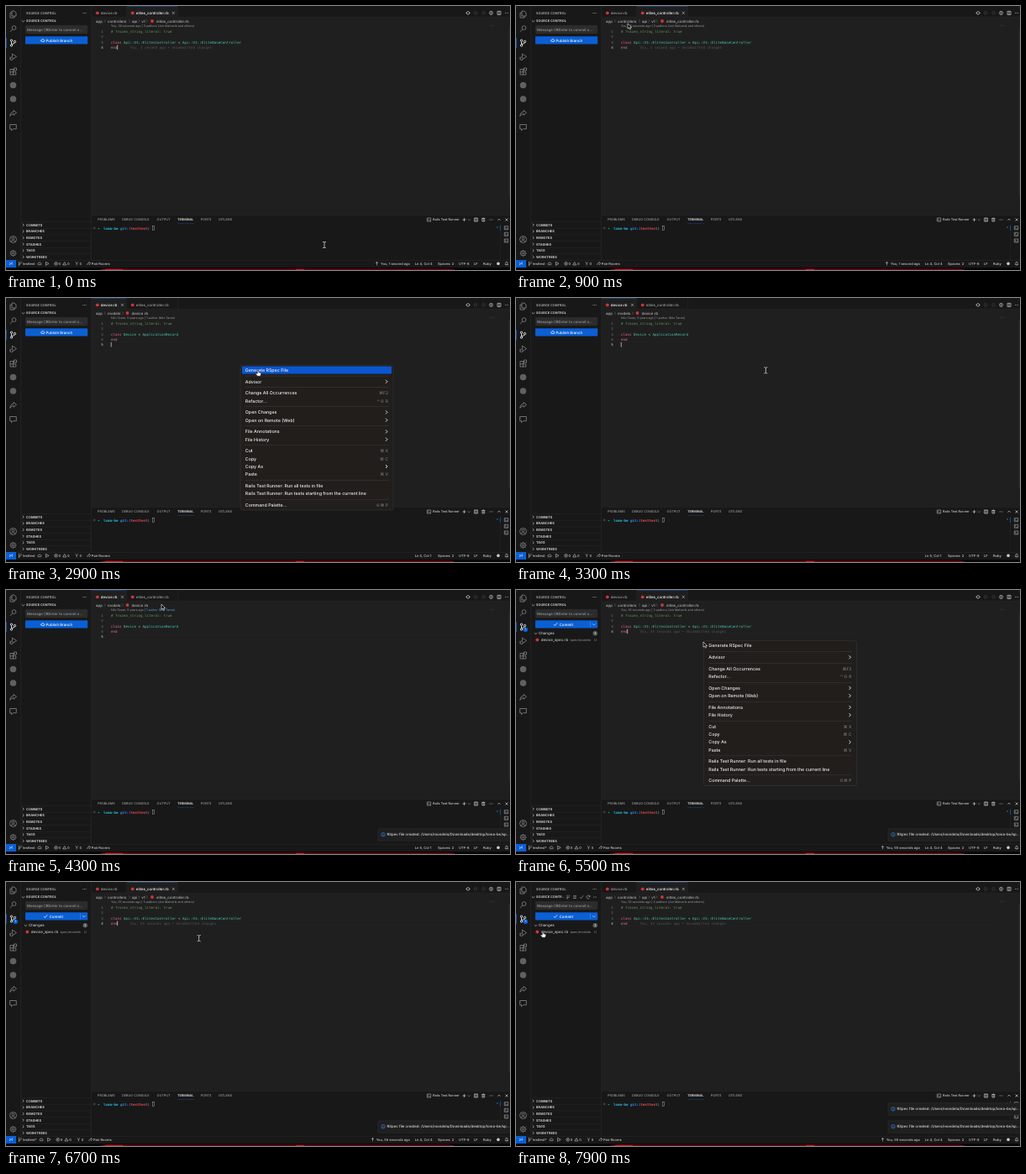
An HTML page that plays this animation: 600x315 px, repeating every 8 s.

```html
<!DOCTYPE html>
<html lang="en">
<head>
<meta charset="utf-8">
<title>Editor session</title>
<style>
html, body { margin: 0; width: 100%; height: 100%; overflow: hidden; background: #1f1f1f; }
svg { display: block; width: 100vw; height: 100vh; }
text { font-family: Inter, "DejaVu Sans", sans-serif; font-weight: 500; text-rendering: geometricPrecision; white-space: pre; }
.mono { font-family: "DejaVu Sans Mono", monospace; font-weight: 400; }
.bold { font-weight: 700; }
.end { text-anchor: end; }
.mid { text-anchor: middle; }
</style>
</head>
<body>
<svg id="stage" viewBox="0 0 600 315"></svg>
<script>
const LOOP = 8000, STEP = 100;
const BLUE = '#0a5fd4', GREY = '#868686', LIGHT = '#cccccc', RED = '#d13438', LINE = '#2b2b2b';

// Markup helpers; text is placed by its vertical centre.
const text = (x, y, s, size = 4.4, fill = LIGHT, cls = '') =>
  `<text x="${x}" y="${y + size * .36}" font-size="${size}" fill="${fill}" class="${cls}">${s}</text>`;
const code = (x, y, s, fill, cls = '') => text(x, y, s, 4.18, fill, 'mono ' + cls);
const box = (x, y, w, h, fill, more = '') =>
  `<rect x="${x}" y="${y}" width="${w}" height="${h}" fill="${fill}" ${more}/>`;
const dot = (x, y, r, fill, more = '') => `<circle cx="${x}" cy="${y}" r="${r}" fill="${fill}" ${more}/>`;
const path = (d, stroke = LIGHT, w = .7, fill = 'none') =>
  `<path d="${d}" stroke="${stroke}" stroke-width="${w}" fill="${fill}"/>`;
const icon = (x, y, d, stroke, w) => `<g transform="translate(${x} ${y})">${path(d, stroke, w)}</g>`;
const group = (id, ...parts) => `<g id="${id}">${parts.join('')}</g>`;
const span = (s, fill) => `<tspan fill="${fill}">${s}</tspan>`;
const ring = r => `M${-r} 0a${r} ${r} 0 1 0 ${2 * r} 0a${r} ${r} 0 1 0 ${-2 * r} 0`;

const RIGHT = 'M-.8 -1.6L.8 0L-.8 1.6', DOWN = 'M-1.6 -.7L0 .9L1.6 -.7', UP = 'M-1.6 .7L0 -.9L1.6 .7';
const CROSS = 'M-1.5 -1.5L1.5 1.5M1.5 -1.5L-1.5 1.5', PLUS = 'M-2 0H2M0 -2V2', CHECK = 'M-2 0L-.6 1.6L2.2 -1.8';
const SPLIT = 'M-2 -2H2V2H-2ZM0 -2V2', DOTS = 'M-2 0h.8M-.4 0h.8M1.2 0h.8';
const BRANCH = 'M-1 -1.6V1.8M1.4 -1.4V-.6Q1.4 .6 -1 .8M-1.6 -2h1.2M.8 -2h1.2M-1.6 2h1.2';
const CLOUD = 'M-1.6 1.3H1.6A1.1 1.1 0 0 0 1.4 -.6A1.6 1.6 0 0 0 -1.4 -.6A1 1 0 0 0 -1.6 1.3';
const TERMINAL = 'M-2.2 -2H2.2V2H-2.2ZM-1.3 -.9L-.3 0L-1.3 .9M.2 1H1.4';
const TRASH = 'M-2 -1.5H2M-1.4 -1.5V2H1.4V-1.5M-.6 -2.1H.6M0 -.6V1.2';
const BEAM = 'M-2 -3.7Q0 -3.7 0 -2.6Q0 -3.7 2 -3.7M0 -2.6V2.6M-2 3.7Q0 3.7 0 2.6Q0 3.7 2 3.7';

function activityBar() {
  const draw = (y, d, color = GREY) => icon(8.5, y, d, color, .8);
  return box(0, 0, 18, 303, '#181818') + box(17.4, 0, .5, 303, LINE) +
    draw(10, 'M-1.5 -4H1.5L3.5 -2V2H-1.5ZM-1.5 -2H-3.5V4H1.5V2') +
    draw(27, 'M-3.5 3.8L-.9 .8M-1.4 -1a2.4 2.4 0 1 0 4.8 0a2.4 2.4 0 1 0 -4.8 0') +
    box(0, 38, .8, 12, BLUE) +
    draw(44, 'M-2 -1.5V1.7M2 -.3Q2 1 -2 1.5M-3.2 -2.8a1.2 1.2 0 1 0 2.4 0a1.2 1.2 0 1 0 -2.4 0M.8 -1.5a1.2 1.2 0 1 0 2.4 0a1.2 1.2 0 1 0 -2.4 0M-3.2 3a1.2 1.2 0 1 0 2.4 0a1.2 1.2 0 1 0 -2.4 0', '#fff') +
    draw(61, 'M-1 -4L4 -.5L-.4 2.5M-1 -4V-.5M-3.6 1.8a1.6 1.9 0 1 0 3.2 0a1.6 1.9 0 1 0 -3.2 0M-4 0L-3 .8M-4.2 2h1') +
    draw(78, 'M-3.5 -2.5H0V4H-3.5ZM-3.5 .8H3.3V4H0M1 -4H4V-1H1Z') +
    dot(8.5, 94.5, 3.8, '#606060') + dot(8.5, 111, 3.8, '#606060') +
    draw(128, 'M.6 -3.6L4 -.6L.6 2.2V.6Q-2 .5 -3.6 3.4Q-3.6 -1.4 .6 -1.8Z') +
    draw(144.5, 'M-3.8 -3H3.8V2.2H0L-2 4V2.2H-3.8Z') +
    draw(278.5, ring(4) + 'M-1.4 -1a1.4 1.4 0 1 0 2.8 0a1.4 1.4 0 1 0 -2.8 0M-2.6 2.8Q0 -.4 2.6 2.8') +
    draw(295, ring(2.9) + ring(1.1) + 'M0 -4V-2.9M0 4V2.9M-4 0H-2.9M4 0H2.9M-2.8 -2.8l.8 .8M2.8 2.8l-.8 -.8M-2.8 2.8l.8 -.8M2.8 -2.8l-.8 .8') +
    group('scmBadge', dot(11.3, 47.2, 2.8, BLUE), text(11.3, 47.2, '1', 3.4, '#fff', 'mid'));
}

function sidebar() {
  const sections = ['COMMITS', 'BRANCHES', 'REMOTES', 'STASHES', 'TAGS', 'WORKTREES'];
  return box(18, 0, 84, 303, '#181818') + box(101.3, 0, .5, 303, LINE) +
    text(24, 8.5, 'SOURCE CONTROL', 3.85) + icon(93.5, 8.5, DOTS) +
    icon(20.5, 18, DOWN) + text(24, 18, 'SOURCE CONTROL', 3.85, LIGHT, 'bold') +
    group('headerActions', box(54.6, 15, 46, 6, '#181818'), text(54.7, 18, '...', 3.85, LIGHT, 'bold'),
      icon(62, 18, BRANCH, LIGHT, .5), icon(70, 18, 'M-1.8 -1.5H1.8M-1.8 0H1.8M-1.8 1.5H1.8', LIGHT, .5),
      icon(78, 18, CHECK, LIGHT, .5), icon(86, 18, 'M1.8 -.6A1.9 1.9 0 1 0 1.6 1M2 -2V-.5H.6', LIGHT, .5), icon(94, 18, DOTS)) +
    box(23.3, 23.3, 73.6, 9.4, '#2c2c2c', 'stroke="#363636" stroke-width=".4" rx=".8"') +
    text(25, 28, 'Message (⌘Enter to commit o...', 4.35, '#989898') +
    box(23, 36.2, 74.2, 9.4, BLUE, 'rx=".8"') +
    group('publish', icon(43.8, 41, CLOUD, '#fff', .8), text(47.5, 41, 'Publish Branch', 4.45, '#fff')) +
    group('changes', icon(47, 41, CHECK, '#fff'), text(51.5, 41, 'Commit', 4.45, '#fff'),
      box(88, 37.7, .4, 6.4, '#6fa4e6'), icon(92.8, 41, DOWN, '#fff', .6),
      icon(23.5, 51.8, DOWN), text(27, 51.8, 'Changes'),
      dot(94.2, 51.8, 2.7, '#616161'), text(94.2, 51.8, '1', 3.6, '#fff', 'mid'),
      dot(25.3, 59.5, 1.9, RED), text(29.8, 59.5, 'device_spec.rb', 4.45, '#c4cfc6'),
      text(64.5, 59.5, 'spec/models', 3.95, '#858585'), text(94.5, 59.5, 'U', 3.8, '#7d8f82', 'mid')) +
    sections.map((name, i) => {
      const y = 261.3 + i * 7.63;
      return box(18, y - 3.8, 83.3, .4, LINE) + icon(20.5, y, RIGHT) + text(24, y, name, 3.9, LIGHT, 'bold');
    }).join('');
}

function tabs() {
  const tab = (id, x, w, name, closeX) =>
    group(id, box(x, 0, w, 13.4, '#1f1f1f'), box(x, 0, w, .4, BLUE), icon(closeX, 8.3, CROSS, LIGHT, .6),
      text(x + 10.8, 8.3, name, 4.4, '#fff'));
  return box(102, 0, 498, 13, '#181818') + box(102, 12.8, 498, .4, LINE) +
    text(112.8, 8.3, 'device.rb', 4.4, '#a4a4a4') + text(154.8, 8.3, 'elites_controller.rb', 4.4, '#a4a4a4') +
    tab('deviceTab', 102, 41.5, 'device.rb', 138.5) + tab('elitesTab', 144, 60, 'elites_controller.rb', 199.3) +
    dot(108.8, 8.3, 1.9, RED) + dot(150.7, 8.3, 1.9, RED) +
    box(143.5, 0, .4, 13, LINE) + box(204, 0, .4, 13, LINE) +
    icon(550, 8.3, ring(1.7) + 'M-2.7 0h1M1.7 0h1') + icon(559, 8.3, ring(1.7), '#444') +
    icon(568.5, 8.3, ring(1.7), '#444') + icon(577.5, 8.3, ring(2) + 'M0 -1V1') +
    icon(587, 8.3, SPLIT) + icon(596, 8.3, DOTS);
}

function crumbs(...items) {
  const [fileX, fileName] = items.pop();
  return items.map(([x, s, sep]) => text(x, 18, s, 4.4, '#b4b4b4') + icon(sep, 18, RIGHT, GREY, .4)).join('') +
    dot(fileX - 5, 18, 1.9, RED) + text(fileX, 18, fileName, 4.4, '#b4b4b4');
}

const lineY = n => 24.2 + n * 6.28;
function sourceLines(current, lines) {
  return box(124.5, lineY(current) - 3.1, 450, 6.2, 'none', 'stroke="#242424" stroke-width=".4"') +
    lines.map((s, i) => code(115.8, lineY(i + 1), i + 1, i + 1 === current ? '#ccc' : '#6e7681', 'end') +
      code(125, lineY(i + 1), s, LIGHT)).join('') +
    [0, 2, 3].map(i => box(575.5, 22 + i * .8, i === 2 ? 9 : 5, .3, '#383838')).join('');
}

function editor() {
  const comment = span('# frozen_string_literal: true', '#6a9955');
  const key = s => span(s, '#e8708c'), type = s => span(s, '#4ec9b0');
  return box(102, 13.2, 498, 236, '#1f1f1f') + box(598.8, 27, .7, 200, '#3a3a3a') +
    group('elitesFile',
      crumbs([107, 'app', 117.8], [121, 'controllers', 147], [150, 'api', 158.4], [161.3, 'v1', 167.6], [179, 'elites_controller.rb']),
      `<text id="lens" x="125" y="25.4" font-size="3.55" fill="#8a8a8a"></text>`,
      sourceLines(4, [comment, '', key('class ') + type('Api::V1::ElitesController') + ' &lt; ' + type('Api::V1::EliteBaseController'), key('end')]),
      `<text id="blame" class="mono" x="147.5" y="${lineY(4) + 1.5}" font-size="4.18" fill="#555"></text>`) +
    group('deviceFile',
      crumbs([107, 'app', 117.8], [121, 'models', 138.8], [149.5, 'device.rb']),
      text(125, 24, 'Nilo Taren, 5 years ago | <tspan id="author">1 author (Nilo Taren)</tspan>', 3.55, '#8a8a8a'),
      sourceLines(5, [comment, '', key('class ') + type('Device') + ' &lt; ' + type('ApplicationRecord'), key('end'), ''])) +
    box(0, 0, .7, 5.6, '#ddd', 'id="caret"');
}

function panel() {
  const names = [[109, 'PROBLEMS'], [138, 'DEBUG CONSOLE'], [179.5, 'OUTPUT'], [204, 'TERMINAL'], [231.8, 'PORTS'], [253, 'GITLENS']];
  return box(102, 249, 498, 54, '#181818') + box(102, 249, 498, .5, LINE) +
    names.map(([x, s]) => text(x, 255, s, 3.8, s === 'TERMINAL' ? '#fff' : '#9d9d9d')).join('') +
    box(204, 259.5, 20, .3, BLUE) + icon(503.5, 255, TERMINAL, LIGHT, .5) + text(508, 255, 'Rails Test Runner', 3.85) +
    icon(545.5, 255, PLUS) + icon(551.3, 255, DOWN, LIGHT, .4) + icon(559.5, 255, SPLIT) + icon(568.3, 255, TRASH) +
    icon(577.5, 255, DOTS) + icon(587, 255, UP) + icon(596, 255, CROSS) +
    dot(105.2, 265, 1, 'none', `stroke="${GREY}" stroke-width=".4"`) +
    code(109, 265, '➜', '#23d18b') +
    code(116, 265, span('loma-be', '#29b8db') + span(' git:(', '#3b8eea') + span('testtest', '#f14c4c') + span(')', '#3b8eea'), LIGHT, 'bold') +
    box(174.3, 262.6, 2.2, 5, 'none', 'stroke="#ccc" stroke-width=".4"') +
    box(588, 261, .4, 42, LINE) + box(588, 261.5, .7, 6.5, BLUE) + dot(585, 264, .7, '#3b8eea') +
    [264.7, 272.3, 280].map(y => icon(595.5, y, TERMINAL, LIGHT, .5)).join('');
}

function statusBar() {
  const label = (x, s) => text(x, 307.4, s, 4.05);
  const mark = (x, d) => icon(x, 307.4, d, LIGHT, .6);
  const live = (id, x, cls = '') => `<text id="${id}" class="${cls}" x="${x}" y="308.9" font-size="4.05" fill="${LIGHT}"></text>`;
  return box(0, 303, 600, 9.3, '#181818') + box(0, 303, 600, .4, LINE) + box(0, 303, 12, 9.3, BLUE) +
    icon(6, 307.4, 'M-2 -1.2L-.4 .2L-2 1.6M2 -1.8L.4 -.4L2 1', '#fff', .7) +
    mark(16.5, BRANCH) + live('branch', 20) +
    group('statusLeft', mark(40, CLOUD), mark(49, 'M-1.6 -2L2 0L-1.6 2Z'),
      mark(59.5, ring(1.8) + 'M-.8 -.8L.8 .8M.8 -.8L-.8 .8'), label(62.5, '0'),
      mark(69.7, 'M0 -1.8L2 1.6H-2Z'), label(73, '0'), mark(84.2, 'M0 -.4V2M-1.6 -1.8Q0 1 1.6 -1.8'), label(87.5, '0'),
      mark(98.5, 'M-2 1.5Q-1.6 -.9 .6 -.9V-2L2.2 -.2L.6 1.4V.5'), label(101.8, 'Pair Rooms')) +
    live('ago', 481, 'end') + group('agoIcon', mark(0, 'M0 -2V2M-1.4 -.4L0 -2L1.4 -.4')) +
    live('position', 486.8) +
    label(514, 'Spaces: 2') + label(539, 'UTF-8') + label(557, 'LF') + label(568, 'Ruby') +
    dot(586, 307.4, 1.8, LIGHT) + mark(596, 'M-1.8 1.2H1.8L1.2 .4V-.8A1.2 1.2 0 0 0 -1.2 -.8V.4ZM-.4 2h.8') +
    box(0, 312.3, 600, 2.7, '#050505') + path('M112 315L120 314.2H526L534 315', '#a80f18', .9) +
    path('M118 314.4H139M345 314.4H355', '#e01c24', 1);
}

const notification = (id, y) => group(id,
  box(443, y, 158, 14.4, '#1f1f1f', 'stroke="#303030" stroke-width=".5" rx="1"'),
  icon(449, y + 7, ring(2.2) + 'M0 -.3V1.2M0 -1.2V-.8', '#3794ff', .6),
  text(453.5, y + 7, 'RSpec file created: /Users/mondelu/Downloads/desktop/loma-be/sp...', 4.35, '#ddd'));

function contextMenu() {
  const more = '›';
  const sections = [
    [['Generate RSpec File']], [['Advisor', more]],
    [['Change All Occurrences', '⌘F2'], ['Refactor...', '⌃⇧ R']],
    [['Open Changes', more], ['Open on Remote (Web)', more]],
    [['File Annotations', more], ['File History', more]],
    [['Cut', '⌘ X'], ['Copy', '⌘ C'], ['Copy As', more], ['Paste', '⌘ V']],
    [['Rails Test Runner: Run all tests in file'], ['Rails Test Runner: Run tests starting from the current line']],
    [['Command Palette...', '⇧⌘ P']]];
  let y = 6, rows = '';
  sections.forEach((section, i) => {
    if (i) rows += box(5.5, y - 6.85, 171, .4, '#45423f');
    for (const [name, hint] of section) {
      rows += text(5.8, y, name, 5.3, '#f0f0f0');
      if (hint === more) rows += icon(174, y, 'M-1 -2L1 0L-1 2', '#eee', .9);
      else if (hint) rows += text(176, y, hint, 5, '#777', 'end');
      y += 9.3;
    }
    y += 4.4;
  });
  return group('menu', box(0, 0, 182, 173, '#211e1c', 'stroke="#3e3b39" stroke-width=".5" rx="2"'),
    box(2, 1.4, 178, 9.2, '#0a56d0', 'id="highlight" rx=".8"'), rows);
}

const pointer = () => group('pointer',
  group('beam', path(BEAM, '#000', 1.5), path(BEAM, '#eee', .8)),
  group('arrow', path('M0 0V6.2L1.5 4.9L2.5 7.1L3.6 6.6L2.6 4.5H4.6Z', '#fff', .6, '#000')),
  group('hand', path('M-.8 -2Q0 -2.9 .8 -2V.6L3.2 1.2Q4 1.6 3.7 2.8L3 5.2H-.8L-3 2.3Q-2.5 1.2 -.8 2.3Z', '#000', .6, '#fff')));

document.getElementById('stage').innerHTML = box(0, 0, 600, 315, '#1f1f1f') + activityBar() + sidebar() +
  editor() + tabs() + panel() + statusBar() + notification('olderNote', 284.8) + notification('newerNote', 263.8) +
  contextMenu() + pointer();

const ui = Object.fromEntries([...document.querySelectorAll('[id]')].map(el => [el.id, el]));
const show = (name, on) => { ui[name].style.display = on ? '' : 'none'; };
const place = (name, x, y) => ui[name].setAttribute('transform', `translate(${x} ${y})`);

// Pointer stops: time, x, y.
const stops = [[0, 379, 285], [200, 379, 285], [1000, 122, 9], [1100, 122, 9], [1600, 279, 81], [1900, 279, 81],
  [2700, 300, 88], [3200, 300, 88], [4300, 185, 17], [4500, 174, 9], [4700, 174, 9], [5200, 223, 62],
  [5500, 223, 62], [6000, 244, 66], [6500, 244, 66], [7200, 172, 72], [7800, 32, 61], [LOOP, 32, 61]];
const caretResets = [0, 1100, 1900, 3400, 4600, 5300, 6400];

function pointerAt(t) {
  const i = stops.findIndex(stop => stop[0] > t);
  const [t0, x0, y0] = stops[i - 1], [t1, x1, y1] = stops[i];
  const k = (t - t0) / (t1 - t0), e = k * k * (3 - 2 * k);
  return [x0 + (x1 - x0) * e, y0 + (y1 - y0) * e];
}

function render(t) {
  const within = (from, to) => t >= from && t < to;
  const [x, y] = pointerAt(t);
  const device = within(1100, 4600), changed = t >= 4500, late = t >= 4600;
  const firstMenu = within(1900, 3100), menu = firstMenu || within(5300, 6400);
  const menuX = firstMenu ? 279 : 223.5;

  for (const part of ['Tab', 'File']) {
    show('device' + part, device);
    show('elites' + part, !device);
  }
  const ago = late ? '55 seconds ago' : '1 second ago';
  ui.lens.textContent = `You, ${late ? 55 : 36} seconds ago | 3 authors (Jon Malverik and others)`;
  ui.blame.textContent = `You, ${ago} • Uncommitted changes`;
  ui.ago.textContent = `You, ${ago}`;
  ui.position.textContent = device ? 'Ln 5, Col 1' : 'Ln 4, Col 4';
  ui.branch.textContent = changed ? 'testtest*' : 'testtest';
  ui.author.setAttribute('fill', y > 14 && y < 28 ? '#4e94ce' : '#8a8a8a');
  show('ago', !device);
  show('agoIcon', !device);
  place('agoIcon', late ? 436.5 : 441.5, 0);
  place('statusLeft', changed ? 2.2 : 0, 0);

  show('publish', !changed);
  show('changes', changed);
  show('scmBadge', changed);
  show('headerActions', x < 102);
  show('olderNote', t >= 3400);
  show('newerNote', t >= 6800);

  const reset = caretResets.filter(r => r <= t).pop();
  show('caret', (t - reset) % 1000 < 500);
  place('caret', device ? 124.8 : 132.4, lineY(device ? 5 : 4) - 2.8);

  const overItem = menu && x > menuX + 2.5;
  show('menu', menu);
  show('highlight', overItem);
  place('menu', menuX, firstMenu ? 80 : 60.5);

  const overText = !menu && x > 102 && (y > 26 && y < 249 || y > 260 && y < 303);
  const shape = overText ? 'beam' : overItem || x < 102 || y < 13 ? 'hand' : 'arrow';
  for (const name of ['beam', 'arrow', 'hand']) show(name, name === shape);
  place('pointer', x, y);
}

function frame() {
  render(Math.floor(performance.now() % LOOP / STEP) * STEP);
  requestAnimationFrame(frame);
}
frame();
</script>
</body>
</html>
```
